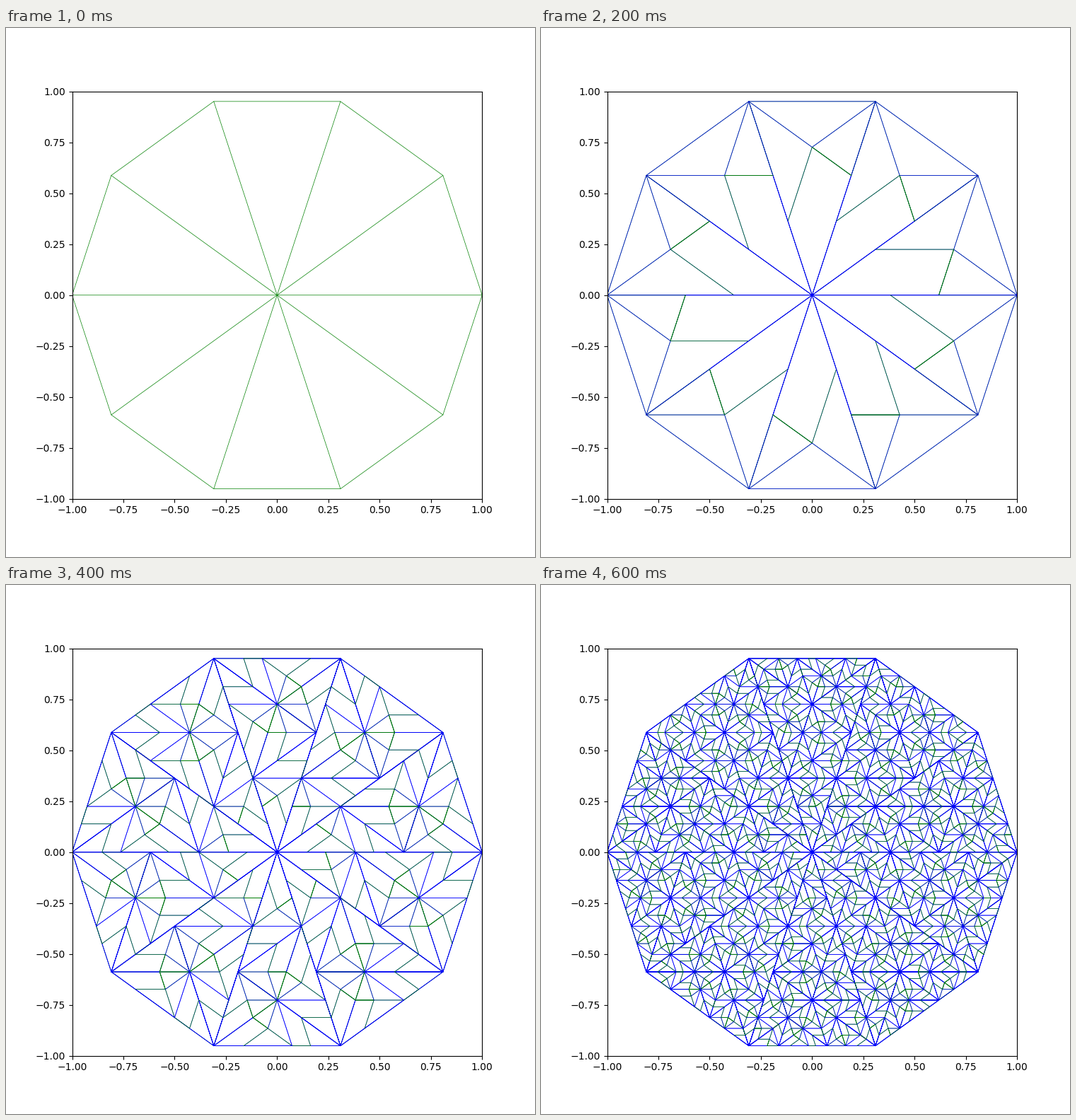
These frames come from a looping animation (748 px wide and 748 px high, 700 ms). A matplotlib script:

```python
import numpy as np
import matplotlib.pyplot as plt
from matplotlib.animation import FuncAnimation
from matplotlib.collections import LineCollection

LEVELS = 7
PHI = (1 + 5 ** 0.5) / 2
ACUTE, OBTUSE = 0, 1
COLORS = {ACUTE: "g", OBTUSE: "b"}


def golden(p, q):
    """Point dividing the segment from p to q in the golden ratio."""
    return p + (q - p) / PHI


def subdivide(triangles):
    """Split each Robinson triangle into smaller ones."""
    out = []
    for kind, a, b, c in triangles:
        if kind == ACUTE:
            p = golden(a, b)
            out += [(ACUTE, c, p, b), (OBTUSE, p, c, a)]
        else:
            q, r = golden(b, a), golden(b, c)
            out += [(OBTUSE, r, c, a), (OBTUSE, q, r, b), (ACUTE, r, q, a)]
    return out


def outlines(triangles):
    """Open two-sided strokes a-b-c, one per triangle, in drawing order."""
    pts = np.array([t[1:] for t in triangles])
    return LineCollection(
        np.stack([pts.real, pts.imag], axis=-1),
        colors=[COLORS[t[0]] for t in triangles],
        linewidths=0.5, capstyle="projecting", joinstyle="round")


fig, ax = plt.subplots(figsize=(7.48, 7.48), dpi=100)
ax.set_xlim(-1, 1)
ax.set_ylim(-1, 1)

rim = np.exp(2j * np.pi * np.arange(11) / 10)
tiles = [(ACUTE, 0j, rim[k], rim[k + 1]) for k in range(10)]
layers = []
for _ in range(LEVELS):
    layers.append(ax.add_collection(outlines(tiles), autolim=False))
    tiles = subdivide(tiles)


def update(level):
    # Each subdivision is drawn on top of all the earlier ones.
    for i, layer in enumerate(layers):
        layer.set_visible(i <= level)
    return layers


anim = FuncAnimation(fig, update, frames=LEVELS, interval=100,
                     repeat=True, repeat_delay=0, blit=False)
plt.show()
```
